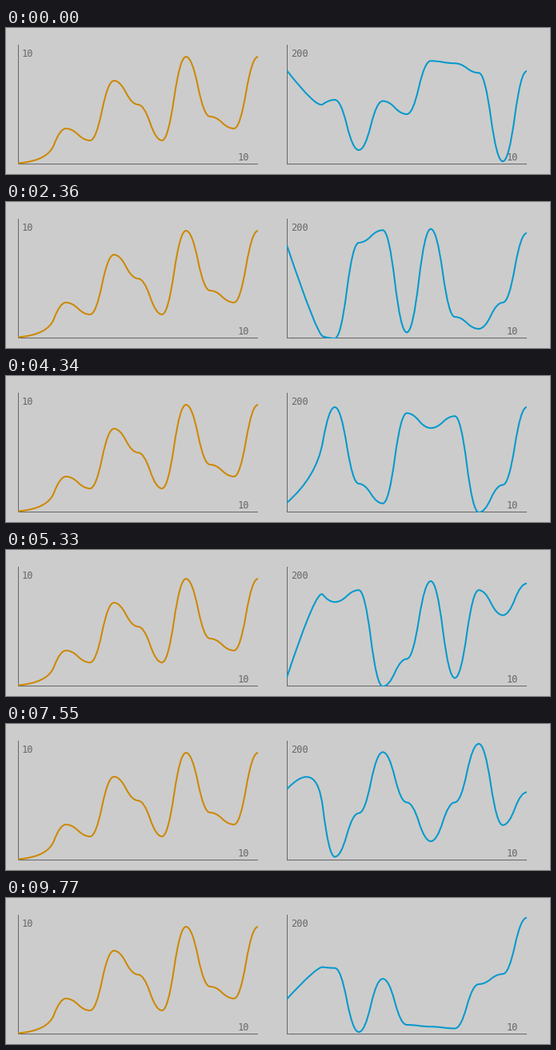
A matplotlib script that plays this animation: 680x183 px, repeating every 9840 ms.

```python
import matplotlib.pyplot as plt
from matplotlib.animation import FuncAnimation
from matplotlib.patches import PathPatch, Rectangle
from matplotlib.path import Path

W, H, DPI = 680, 183, 100
PX = 72 / DPI
INTERVAL, LOOP = 20, 9840
TOP, PLOT_W, PLOT_H = 21, 300, 150
BASE = TOP + PLOT_H
COUNT = 11
GREY = "#666666"

STEADY = [0.1, 0.3, 3, 2, 7, 5, 2, 9, 4, 3, 9]
STREAM = [157, 93, 108, 24, 106, 84, 173, 169, 153, 5, 156, 7, 0, 160, 181,
          10, 183, 36, 16, 60, 176, 48, 15, 166, 141, 161, 0, 46, 176, 14,
          161, 119, 172, 6, 79, 181, 97, 32, 97, 195, 59, 114, 111, 4, 93,
          16, 13, 10, 84, 101, 195]

fig = plt.figure(figsize=(W / DPI, H / DPI), dpi=DPI, facecolor="#cccccc")
ax = fig.add_axes([0, 0, 1, 1])
ax.set(xlim=(0, W), ylim=(H, 0))
ax.axis("off")


def smooth(values, left, peak):
    """Curve that is level at each point; the first one only steers it."""
    step = PLOT_W / (COUNT - 1)
    pts = [(left + i * step, BASE - v * PLOT_H / peak)
           for i, v in enumerate(values)]
    verts = [pts[0]]
    for (x0, y0), (x1, y1) in zip(pts[1:], pts[2:]):
        xm, ym = (x0 + x1) / 2, (y0 + y1) / 2
        # the control past the first inner point sits a quarter step along
        verts += [((x0 + xm) / 2, y0), (xm, ym), ((xm + x1) / 2, y1), (x1, y1)]
    return Path(verts, [Path.MOVETO] + [Path.CURVE3] * (len(verts) - 1))


def label(x, y, text):
    ax.text(x, y, text, family="DejaVu Sans Mono", size=12 * PX,
            color=GREY, ha="left", va="baseline")


def chart(left, peak, values, color):
    for x, y, w, h in ((left, TOP, 1, PLOT_H), (left, BASE - 1, PLOT_W, 1)):
        ax.add_patch(Rectangle((x, y), w, h, fc=GREY, lw=0))
    label(left + 5, 36, str(peak))
    label(left + 275, 166, "10")
    curve = PathPatch(smooth(values, left, peak), fc="none", ec=color,
                      lw=2 * PX, capstyle="butt", joinstyle="round",
                      snap=False, zorder=2)
    ax.add_patch(curve)
    curve.set_clip_path(Rectangle((left, TOP), PLOT_W, PLOT_H,
                                  transform=ax.transData))
    return curve


def shift(t):
    """Number of samples that have scrolled out after t milliseconds."""
    if t < 150:
        return 0
    if t < 5330:
        return min(21, 1 + int((t - 150) / 245.5))
    return min(40, 22 + int((t - 5330) / 246.6))


chart(15, 10, STEADY, "#cc8800")
live = chart(351, 200, STREAM[:COUNT], "#0099cc")


def update(i):
    k = shift(i * INTERVAL + INTERVAL / 2)
    live.set_path(smooth(STREAM[k:k + COUNT], 351, 200)) if hasattr(
        live, "set_path") else None
    return [live]


anim = FuncAnimation(fig, update, frames=LOOP // INTERVAL, interval=INTERVAL,
                     repeat=True, repeat_delay=0, init_func=lambda: update(0))
plt.show()
```
